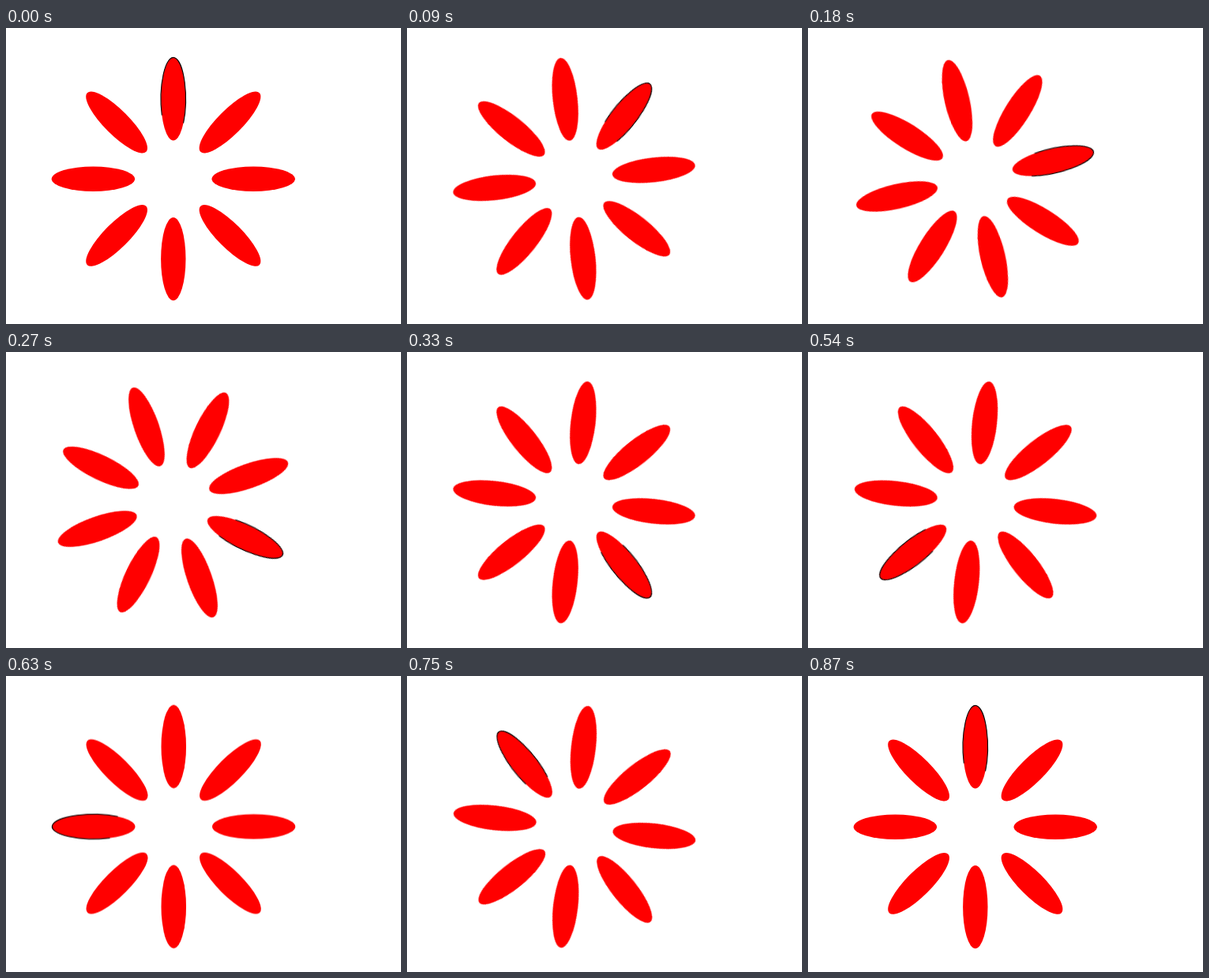
These frames come from a looping animation (500 by 375 pixels, 0.9 s). An HTML page:

```html
<!DOCTYPE html>
<html lang="en">
<head>
<meta charset="utf-8">
<title>Turning petals</title>
<style>
  html, body { margin: 0; width: 100%; height: 100%; overflow: hidden; background: #fff; }
  svg { display: block; width: 500px; height: 375px; }
  #wheel { transform-origin: 211.8px 190.8px; }
</style>
</head>
<body>
<svg viewBox="0 0 500 375">
  <g id="wheel">
    <g id="flower" transform="translate(211.8 191.2)" fill="#f00"></g>
  </g>
</svg>
<script>
  const NS = 'http://www.w3.org/2000/svg';
  const PETALS = 8, RADIUS = 101.4, RX = 15.7, RY = 52.7;
  const STEP = 30, TURN_STEPS = 28, LOOP = 900;
  const flower = document.getElementById('flower');

  function add(tag, attrs) {
    const el = document.createElementNS(NS, tag);
    for (const key in attrs) el.setAttribute(key, attrs[key]);
    flower.append(el);
  }

  for (let i = 0; i < PETALS; i++) {
    add('ellipse', { cy: -RADIUS, rx: RX, ry: RY, transform: `rotate(${i * 360 / PETALS})` });
  }

  // Open outline around the outer part of one petal
  add('path', {
    d: `M-14.5 21A${RX} ${RY} 0 1 1 12.8 31`,
    transform: `translate(0 ${-RADIUS - 0.3})`,
    fill: 'none', stroke: '#000', 'stroke-width': 1.1
  });

  // One full turn in even steps, then a single step of rest
  document.getElementById('wheel').animate([
    { transform: 'rotate(0deg)', easing: `steps(${TURN_STEPS}, end)` },
    { transform: 'rotate(360deg)', offset: TURN_STEPS * STEP / LOOP },
    { transform: 'rotate(360deg)' }
  ], { duration: LOOP, iterations: Infinity, delay: -1 });
</script>
</body>
</html>
```
